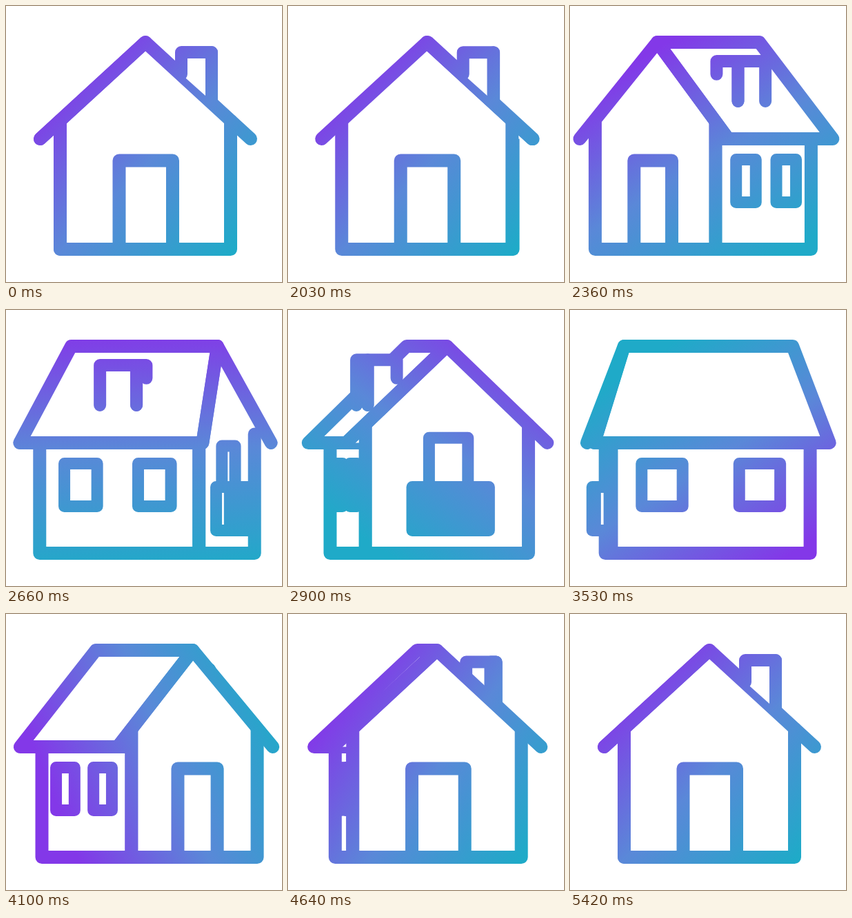
Recreate the animation shown at these times as an HTML page with a canvas. Size 400 by 400 pixels, loop 5.45 s.

```html
<!DOCTYPE html>
<html lang="en">
<head>
<meta charset="utf-8">
<title>Turning house</title>
<style>
  html, body { margin: 0; width: 100%; height: 100%; overflow: hidden; background: #fff; }
  canvas { display: block; }
</style>
</head>
<body>
<canvas id="stage" width="400" height="400"></canvas>
<script>
const ctx = document.getElementById('stage').getContext('2d');
const LOOP = 5450, START = 2030, STEP = 30;
const TOP = 52.5, EAVE = 192.5, FLOOR = 352.5;
const ROOF_HALF = 152.5, WALL_HALF = 123.5;
const THICK = 19, MEDIUM = 18, THIN = 17;

// time in ms, turn in degrees
const TURN = [[2000, 0], [2660, 109], [3170, 221], [3530, 268], [4100, 317.5],
              [4280, 337], [4880, 356.5], [5420, 360]];

// reach of each part, by degrees away from the nearest gable view
const KNOTS = [0, 41.6, 71, 90];
const SHAPE = {
  eave:    [0, 72, 134, 175],
  eaveFar: [0, 66, 131, 175],
  ridge:   [0, 69, 106, 124],
  wall:    [0, 71, 119.5, 148],
  wallFar: [0, 56, 111.5, 147],
  wallTop: [166, 167, 180, 193]
};
const CURVES = {};
for (const key in SHAPE) CURVES[key] = SHAPE[key].map((v, i) => [KNOTS[i], v]);

const clamp = (v, lo, hi) => Math.min(hi, Math.max(lo, v));

// monotone cubic through a list of [x, y]
function curve(pts, x, flatEnds) {
  const last = pts.length - 1;
  if (x <= pts[0][0]) return pts[0][1];
  if (x >= pts[last][0]) return pts[last][1];
  const rise = i => (pts[i + 1][1] - pts[i][1]) / (pts[i + 1][0] - pts[i][0]);
  const slope = i => {
    if (i === 0) return flatEnds ? 0 : rise(0);
    if (i === last) return flatEnds ? 0 : rise(last - 1);
    const a = rise(i - 1), b = rise(i);
    return a * b <= 0 ? 0 : 2 * a * b / (a + b);
  };
  let i = 0;
  while (x > pts[i + 1][0]) i++;
  const h = pts[i + 1][0] - pts[i][0], u = (x - pts[i][0]) / h, v = 1 - u;
  return pts[i][1] * (1 + 2 * u) * v * v + slope(i) * h * u * v * v +
         pts[i + 1][1] * u * u * (3 - 2 * u) - slope(i + 1) * h * u * u * v;
}

function trace(pts, closed) {
  ctx.beginPath();
  pts.forEach(([x, y], i) => i ? ctx.lineTo(x, y) : ctx.moveTo(x, y));
  if (closed) ctx.closePath();
}
function line(...pts) { trace(pts, false); ctx.stroke(); }
function blank(...pts) { trace(pts, true); ctx.fillStyle = '#fff'; ctx.fill(); }
function panel(...pts) { blank(...pts); trace(pts, true); ctx.stroke(); }
const box = (l, t, r, b) => [[l, t], [r, t], [r, b], [l, b]];

function setPaint(t) {
  const u = clamp((t - 2000) / 2930, 0, 1);
  const dir = Math.PI / 4 + Math.PI * (1 - Math.cos(Math.PI * u));
  const dx = 175 * Math.cos(dir), dy = 175 * Math.sin(dir);
  const paint = ctx.createLinearGradient(232 - dx, 202 - dy, 232 + dx, 202 + dy);
  paint.addColorStop(0, '#8338e8');
  paint.addColorStop(0.5, '#5a88d8');
  paint.addColorStop(1, '#1faac8');
  ctx.strokeStyle = paint;
  return paint;
}

function drawChimney(cx, sin, cos, tilt) {
  const top = 67 + 13 * Math.min(1, tilt / 42);
  const at = (c, z) => cx + c * cos - z * sin;
  const foot = c => TOP + c * 0.89;
  const inner = 52, outer = 96, front = 35, rear = -21;
  const z = cos >= 0 ? front : rear;
  const other = front + rear - z;
  const faces = [
    [[at(inner, z), foot(inner)], [at(inner, z), top],
     [at(outer, z), top], [at(outer, z), foot(outer)]],
    [[at(outer, z), foot(outer)], [at(outer, z), top],
     [at(outer, other), top], [at(outer, other), foot(outer)]]
  ];
  ctx.lineWidth = MEDIUM;
  for (const face of faces) blank(...face);
  for (const face of faces) line(...face);
}

function drawHouse(t) {
  const paint = setPaint(t);
  const turn = curve(TURN, t, true) % 360;
  const rad = turn * Math.PI / 180;
  const sin = Math.sin(rad), cos = Math.cos(rad);
  const s = Math.abs(sin), c = Math.abs(cos);
  const tilt = Math.asin(Math.min(1, s)) * 180 / Math.PI;
  const side = sin * cos > 0 ? -1 : 1;   // where the visible gable lies
  const cx = 200.5 + 1.5 * Math.max(0, 1 - tilt / 30);
  const X = v => cx + side * v;
  const get = key => curve(CURVES[key], tilt, false);
  const eave = get('eave'), wall = get('wall'), ridge = get('ridge');
  const roofW = ROOF_HALF * c, wallW = WALL_HALF * c;
  const wallTop = get('wallTop');

  const eaveOut = [X(eave + roofW), EAVE];
  const eaveNear = [X(eave - roofW), EAVE];
  const eaveFar = [X(-get('eaveFar') - roofW), EAVE];
  const apex = [X(ridge), TOP], ridgeFar = [X(-ridge), TOP];
  const out = wall + wallW, near = wall - wallW, far = -get('wallFar') - wallW;
  const lean = 4 * 2 * s * c;

  const chimneySeen = turn < 180;
  if (!chimneySeen) drawChimney(cx, sin, cos, tilt);

  // long side and its windows
  ctx.lineWidth = THICK;
  panel(...box(X(far), EAVE, X(near), FLOOR));
  const len = near - far;
  const gap = len * (0.207 + 0.04 * clamp((tilt - 41) / 49, 0, 1));
  const mid = (near + far) / 2 - lean;
  ctx.lineWidth = THIN;
  for (const k of [-1, 1]) {
    const w = mid + k * gap, half = len * 0.103;
    panel(...box(X(w - half), 222.5, X(w + half), 284.5));
  }

  // gable end
  ctx.lineWidth = THICK;
  blank([X(near), FLOOR], [X(near), EAVE], eaveNear, apex, eaveOut, [X(out), EAVE], [X(out), FLOOR]);
  line([X(near), wallTop], [X(near), FLOOR], [X(out), FLOOR], [X(out), wallTop]);
  const centre = wall + lean;
  if (cos >= 0) {
    const half = 38.75 * c, m = centre + 0.75 * c * side;
    line([X(m - half), FLOOR], [X(m - half), 224], [X(m + half), 224], [X(m + half), FLOOR]);
  } else {
    const half = 29.5 * c, wide = 55 * c, push = 21 * s, top = 180 + 18 * s;
    ctx.lineWidth = THIN;
    line([X(centre - half), 257], [X(centre - half), top],
         [X(centre + half), top], [X(centre + half), 257]);
    panel(...box(X(centre - wide), 256.5, X(centre - wide + push), 319.5));
    trace(box(X(centre + push - wide), 256.5, X(centre + push + wide), 319.5), true);
    ctx.fillStyle = paint;
    ctx.fill();
    ctx.stroke();
  }

  // roof
  ctx.lineWidth = THICK;
  panel(eaveFar, eaveNear, apex, ridgeFar);
  line(eaveNear, apex, eaveOut);
  if (chimneySeen) drawChimney(cx, sin, cos, tilt);
}

ctx.lineCap = ctx.lineJoin = 'round';
const begin = performance.now();

function frame(now) {
  const t = Math.max(0, now - begin) % LOOP;
  const held = t < START ? 0 : START + Math.floor((t - START) / STEP) * STEP;
  ctx.clearRect(0, 0, 400, 400);
  drawHouse(held);
  requestAnimationFrame(frame);
}
frame(begin);
</script>
</body>
</html>
```
